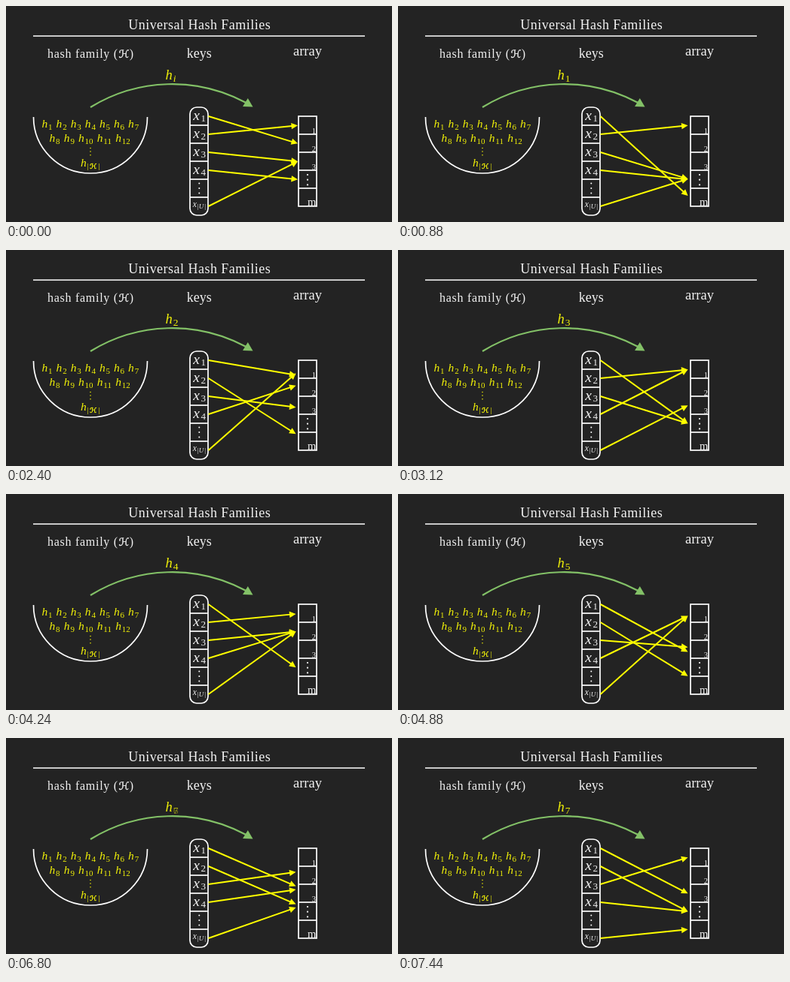
These frames come from a looping animation (512x288 px, 7.6 s). An HTML page:

```html
<!DOCTYPE html>
<html lang="en">
<head>
<meta charset="utf-8">
<title>Universal Hash Families</title>
<style>
  html, body { margin: 0; width: 100%; height: 100%; overflow: hidden; background: #232323; }
  svg { display: block; width: 512px; height: 288px; }
  text { font-family: "Liberation Serif", "Noto Serif", serif; fill: #f2f2f2; }
  .it { font-style: italic; }
  .yellow { fill: #f0f008; }
  .script { font-family: "DejaVu Sans", "DejaVu Serif", serif; stroke: #f2f2f2; stroke-width: 0.4; }
  .script.yellow { stroke: #f0f008; }
  .line { fill: none; stroke: #fff; stroke-width: 1.7; }
</style>
</head>
<body>
<svg id="stage" viewBox="0 0 512 288"></svg>
<script>
const stage = document.getElementById('stage');

function add(tag, attrs, content = '') {
  const node = document.createElementNS('http://www.w3.org/2000/svg', tag);
  for (const key in attrs) node.setAttribute(key, attrs[key]);
  node.textContent = content;
  return stage.appendChild(node);
}

const line = d => add('path', { d, class: 'line' });

const write = (content, x, y, size, cls = '', more = {}) =>
  add('text', { x, y, 'font-size': size, class: cls, ...more }, content);

function dots(x, y, gap, r, fill) {
  for (let i = 0; i < 3; i++) add('circle', { cx: x, cy: y + i * gap, r, fill });
}

// Headings
const middle = { 'text-anchor': 'middle' };
write('Universal Hash Families', 256.7, 31, 18, '', { ...middle, 'letter-spacing': 0.48 });
line('M36 40H476');
write('hash family (', 55, 68.5, 16, '', { 'letter-spacing': 0.72 });
write('ℋ', 156.5, 68.5, 14, 'script', middle);
write(')', 163.8, 68.5, 16);
write('keys', 256.3, 69, 18, '', middle);
write('array', 400, 66, 18.5, '', middle);

// Bowl of hash functions
line('M36.5 148A75.5 75 0 0 0 187.5 148');

function bowlItem(sub, x, y) {
  write('h', x, y, 15.5, 'it yellow');
  write(sub, x + 8.6, y + 2.5, 11, 'yellow');
}
for (let i = 0; i < 7; i++) bowlItem(i + 1, 47.5 + i * 19.1, 162);
[57.5, 76.8, 96, 120.7, 145.2].forEach((x, i) => bowlItem(i + 8, x, 181));
dots(112, 189.5, 4.6, 0.75, '#ff0');
bowlItem('|', 99, 214);
write('ℋ', 116, 216.5, 9.5, 'script yellow', middle);
write('|', 122.6, 216.5, 11, 'yellow');

// Curved arrow
add('path', {
  d: 'M112 135A206 206 0 0 1 318.5 129', fill: 'none', stroke: '#83c167', 'stroke-width': 2.2
});
add('path', { d: 'M327.5 134.5L320.8 123L314 134Z', fill: '#83c167' });

// Key column
add('rect', { x: 244, y: 135, width: 24, height: 144, rx: 9, class: 'line' });
for (let y = 159; y < 279; y += 24) line(`M244 ${y}H268`);
for (let i = 0; i < 4; i++) {
  write('x', 248.2, 151.5 + i * 24, 19.5, 'it');
  write(i + 1, 258.5, 154 + i * 24, 13);
}
dots(256.3, 236.5, 6.5, 1, '#fff');
write('x', 247.8, 268, 11.5, 'it');
write('|', 253.8, 269.7, 9);
write('U', 255.8, 269.7, 9, 'it');
write('|', 263.3, 269.7, 9);

// Array column
add('rect', { x: 388, y: 147, width: 24, height: 120, class: 'line' });
for (let y = 171; y < 267; y += 24) line(`M388 ${y}H412`);
for (let i = 0; i < 3; i++) write(i + 1, 408.3, 170.3 + i * 24, 10.5, '', middle);
dots(400, 225, 6.7, 1.1, '#fff');
write('m', 405.6, 265.5, 14.5, '', middle);

// Changing mapping: the array slot of each key, for every function in turn
const names = ['i', 1, 2, 3, 4, 5, 6, 7];
const slots = ['10232', '40333', '04210', '30302', '30111', '24200', '12201', '23034'];
const LOOP = 7600, TICK = 80, SPAN = 1036, DELAY = 27;
const starts = [147, 171, 195, 219, 267];

const arrows = starts.map(() => ({
  shaft: add('path', { stroke: '#ff0', 'stroke-width': 2 }),
  head: add('path', { fill: '#ff0' })
}));

write('h', 211.5, 98, 18.5, 'it yellow');
const label = () => write('', 221.8, 101, 13.5, 'yellow');
const oldSub = label(), newSub = label();

const mix = (a, b, k) => a + (b - a) * k;
const clamp = v => Math.min(1, Math.max(0, v));

function smooth(t) {
  const s = v => 1 / (1 + Math.exp(-v));
  const edge = s(-5);
  return clamp((s(10 * (t - 0.5)) - edge) / (1 - 2 * edge));
}

function setArrow({ shaft, head }, y0, x, y) {
  const x0 = 268.5;
  const len = Math.hypot(x - x0, y - y0);
  const ux = (x - x0) / len, uy = (y - y0) / len;
  const bx = x - ux * 8.5, by = y - uy * 8.5;
  shaft.setAttribute('d', `M${x0} ${y0}L${bx + ux} ${by + uy}`);
  head.setAttribute('d',
    `M${x} ${y}L${bx - uy * 4.2} ${by + ux * 4.2}L${bx + uy * 4.2} ${by - ux * 4.2}Z`);
}

function setSub(node, name, opacity) {
  node.textContent = name;
  node.style.fontStyle = name === 'i' ? 'italic' : 'normal';
  node.setAttribute('opacity', opacity);
}

function draw(time) {
  const t = Math.floor((time % LOOP) / TICK) * TICK;
  const turn = Math.min(7, Math.max(0, (t - DELAY) / SPAN));
  const from = Math.min(6, Math.floor(turn));
  const k = smooth(turn - from);
  const endX = from ? 384.5 : mix(387, 384.5, k);
  arrows.forEach((arrow, i) => {
    const slot = mix(+slots[from][i], +slots[from + 1][i], k);
    setArrow(arrow, starts[i], endX, 159.3 + 24 * slot);
  });
  const fade = clamp((k - 0.42) / 0.28);
  setSub(oldSub, names[from], 1 - fade);
  setSub(newSub, names[from + 1], fade);
}

const begin = performance.now();
function loop() {
  draw(performance.now() - begin);
  requestAnimationFrame(loop);
}
loop();
</script>
</body>
</html>
```
